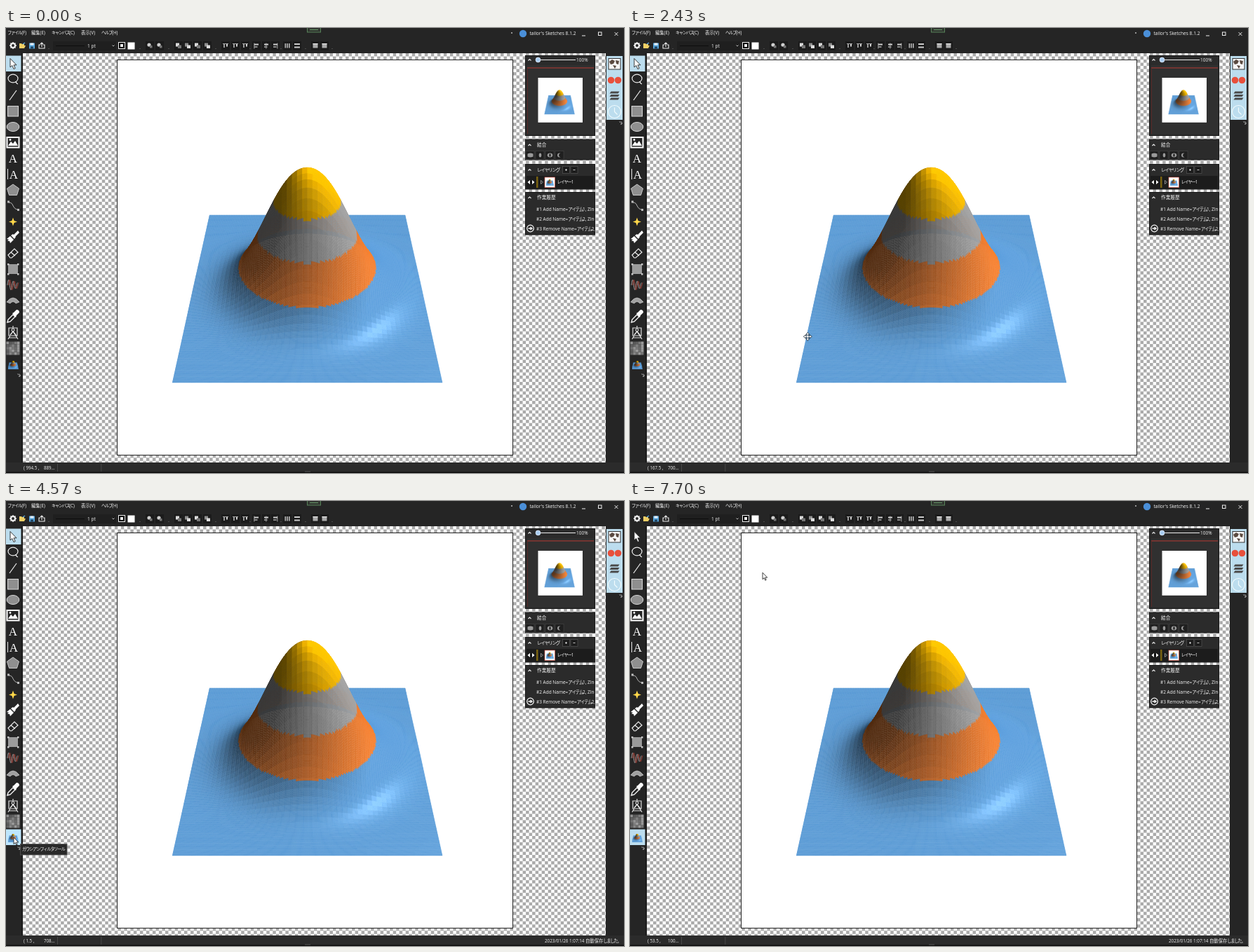
Write an HTML page with a canvas that moves like this. It is 881 px wide and 635 px high and loops after 8000 ms.

```html
<!DOCTYPE html>
<html lang="ja">
<head>
<meta charset="utf-8">
<title>Drawing editor</title>
<style>
html, body { margin: 0; width: 100%; height: 100%; overflow: hidden; background: #252525; }
canvas { display: block; }
</style>
</head>
<body>
<canvas id="stage" width="881" height="635"></canvas>
<script>
const W = 881, H = 635, LOOP = 8000;
const SANS = '"Open Sans", "Noto Sans CJK JP", "Noto Sans CJK", sans-serif';
const LIGHT = '#eeeeee', GREY = '#8f8f8f', DARK = '#252525', SELECTED = '#bcddee';
const screen = document.getElementById('stage').getContext('2d');
let g;

function layer() {
  const c = document.createElement('canvas');
  c.width = W;
  c.height = H;
  return c;
}
function rect(x, y, w, h, fill, stroke, lw = 1) {
  if (fill) { g.fillStyle = fill; g.fillRect(x, y, w, h); }
  if (stroke) { g.strokeStyle = stroke; g.lineWidth = lw; g.strokeRect(x, y, w, h); }
}
function path(x, y, d, fill, stroke, lw = 1) {
  const p = new Path2D(d);
  g.save();
  g.translate(x, y);
  if (fill) { g.fillStyle = fill; g.fill(p); }
  if (stroke) { g.strokeStyle = stroke; g.lineWidth = lw; g.stroke(p); }
  g.restore();
}
function oval(x, y, rx, ry, fill, stroke, lw = 1) {
  g.beginPath();
  g.ellipse(x, y, rx, ry, 0, 0, 7);
  if (fill) { g.fillStyle = fill; g.fill(); }
  if (stroke) { g.strokeStyle = stroke; g.lineWidth = lw; g.stroke(); }
}
// Kana are set tighter than kanji and Latin.
function text(s, x, y, size = 6.4, color = '#f4f4f4') {
  g.font = `${size}px ${SANS}`;
  g.textBaseline = 'alphabetic';
  g.fillStyle = color;
  for (const run of s.match(/[\u3000-\u30ff]+|[^\u3000-\u30ff]+/g)) {
    g.letterSpacing = run[0] >= '\u3000' && run[0] <= '\u30ff' ? `${-0.2 * size}px` : '0px';
    g.fillText(run, x, y + size * 0.36);
    x += g.measureText(run).width;
  }
  g.letterSpacing = '0px';
}

// ---- 3D bell surface on a plane of half-size 1 by DEPTH ----
const DEPTH = 1.2;
const bell = r => 1.131 * Math.exp(-5.25 * r ** 2.2);
const unit = a => { const l = Math.hypot(...a); return a.map(k => k / l); };
const dot = (a, b) => a[0] * b[0] + a[1] * b[1] + a[2] * b[2];
const sheen = unit([0.36, 0.8, 0.45]);

function project(u, v) {
  const h = bell(Math.hypot(u, v)), z = 6.01 + 0.8 * v - 0.6 * h;
  return [429.5 + 972 * u / z, 367.4 - 972 * (0.6 * v + 0.8 * h) / z];
}
function bandColor(h) {
  if (h < 0.22) return [91, 155, 213];
  if (h < 0.53) return [237, 125, 49];
  return h < 0.84 ? [165, 165, 165] : [255, 192, 0];
}
function facet(u, v) {
  const r = Math.hypot(u, v), h = bell(r), slope = 11.55 * r ** 0.2 * h;
  const n = unit([u * slope, 1, v * slope]);
  const view = unit([-u, 3.6 - h, -4.81 - v]), d = dot(n, view);
  const mirror = n.map((k, i) => 2 * d * k - view[i]);
  return {
    light: Math.min(1.04, 0.35 + Math.max(0, 0.42 * n[0] + 0.65 * n[1])),
    gloss: 46 * Math.max(0, dot(mirror, sheen)) ** 38
  };
}
function drawHill() {
  const cells = 50, sub = 4, n = cells * sub, at = i => i * 2 / n - 1;
  const facets = [];
  for (let i = 0; i < cells * cells; i++) {
    const u = (i % cells + 0.5) * 2 / cells - 1;
    facets.push(facet(u, DEPTH * ((Math.floor(i / cells) + 0.5) * 2 / cells - 1)));
  }
  g.lineWidth = 0.5;
  for (let j = n - 1; j >= 0; j--) {
    const near = DEPTH * at(j), far = DEPTH * at(j + 1);
    for (let i = 0; i < n; i++) {
      const f = facets[Math.floor(j / sub) * cells + Math.floor(i / sub)];
      const h = bell(Math.hypot(at(i + 0.5), (near + far) / 2));
      const rgb = bandColor(h).map(k => Math.min(255, Math.round(k * f.light + f.gloss)));
      g.fillStyle = g.strokeStyle = `rgb(${rgb})`;
      g.beginPath();
      g.moveTo(...project(at(i), near));
      g.lineTo(...project(at(i + 1), near));
      g.lineTo(...project(at(i + 1), far));
      g.lineTo(...project(at(i), far));
      g.fill();
      g.stroke();
    }
  }
}
const hill = layer();
g = hill.getContext('2d');
drawHill();

function hillIcon(x, y, w, h) {
  g.drawImage(hill, 237, 195, 386, 313, x, y, w, h);
}

// ---- static interface ----
function drawBars() {
  rect(0, 0, W, H, DARK);
  const s = 4.51;
  rect(24, 36, 831, 584, '#ffffff');
  g.save();
  g.beginPath();
  g.rect(24, 36, 831, 584);
  g.clip();
  for (let j = 0; j < 130; j++)
    for (let i = 1 - j % 2; i < 186; i += 2) rect(24 + i * s, 36 + j * s, s, s, '#aaaaaa');
  g.restore();
  rect(158.5, 45.5, 564, 564, '#ffffff', '#222222');
  g.drawImage(hill, 0, 0);
  rect(22, 36, 2, 584, '#1b1b1b');
  rect(0, 620, W, 15, '#2b2b2b');
  rect(0, 633.5, W, 1.5, '#0c0c0c');
  for (const x of [73, 135.5]) rect(x, 622, 0.7, 11, '#555555');
  rect(426, 632.5, 8, 1, '#555555');

  [['ファイル(F)', 2], ['編集(E)', 36], ['キャンバス(C)', 65], ['表示(V)', 107], ['ヘルプ(H)', 136]]
    .forEach(([s, x]) => text(s, x, 7, 6.3));
  rect(429.5, -2, 19, 8, '#30352f', '#58835a');
  rect(433, 2, 12, 1, '#6a9a6c');
  oval(721, 7, 1, 1, '#bbbbbb');
  oval(737, 8, 5.2, 5.2, '#4a8fd8');
  text("tailor's Sketches 8.1.2", 746.5, 8, 6.6);
  rect(821, 10.5, 5, 1, LIGHT);
  rect(844.5, 6, 4.5, 4.5, null, LIGHT);
  path(870, 8.5, 'M-2.4-2.4L2.4 2.4M2.4-2.4L-2.4 2.4', null, LIGHT);
}

function drawToolbar() {
  oval(10, 25, 3, 3, null, LIGHT, 2.2);
  path(10, 25, 'M0-5V-3M0 3V5M-5 0H-3M3 0H5M-3.5-3.5L-2-2M2 2L3.5 3.5M3.5-3.5L2-2M-2 2L-3.5 3.5', null, LIGHT, 1.5);
  path(23, 25, 'M-4 4V-3H-1L0-2H3V0H5L3 4Z', '#f0cf65');
  path(23, 25, 'M1-2L4-4', null, '#5aa9e6', 1.3);
  rect(33, 21.5, 8, 8, '#57a5dc');
  rect(34.5, 21.5, 5, 3, '#e8f2fa');
  rect(35, 26.5, 4, 3, '#1f4563');
  path(51, 25, 'M-2-1H-4V4H4V-1H2M0 2V-4M-2-2L0-4L2-2', null, LIGHT, 1.1);
  for (const x of [61, 191, 232, 299, 348, 392, 427, 465]) oval(x, 29.5, 0.6, 0.6, '#777777');

  rect(67, 19, 90, 13, '#1f1f1f');
  rect(71, 25, 41, 0.8, '#090909');
  text('1 pt', 116, 25.5, 6.5);
  path(153, 25, 'M-1.5-.5L0 1L1.5-.5', null, LIGHT, 0.8);
  rect(160.5, 20.5, 9, 9, '#000000', LIGHT);
  rect(163, 23, 4, 4, LIGHT);
  rect(173.5, 20.5, 10, 10, '#ffffff');

  const slots = [205, 219, 246, 259, 273, 287, 313, 327, 341, 357, 371, 384, 401, 415, 441, 454];
  slots.forEach((x, i) => {
    rect(x - 6, 19, 12, 12.5, '#1b1b1b');
    if (i < 2) {
      oval(x - 1, 24, 2.6, 2.6, '#cfcfcf');
      rect(x, 25, 3.5, 3.5, '#777777');
    } else if (i < 6) {
      rect(x - 4, 21.5, 5, 5, i % 2 ? '#8d8d8d' : '#dddddd');
      rect(x - 1, 24.5, 5, 4.5, i % 2 ? '#dddddd' : '#777777');
    } else if (i < 9) {
      rect(x - 4, 22, 8, 0.8, '#cccccc');
      rect(x - 3, 23, 2, 5, '#999999');
      rect(x + 1, 23, 2, 3.5, '#cccccc');
    } else if (i < 12) {
      rect(x - 3.5 + (i - 9) * 3, 21.5, 0.8, 8, '#cccccc');
      rect(x - 3, 22.5, 6, 2, '#cccccc');
      rect(x - 3, 26, 4.5, 2, '#888888');
    } else if (i === 12) {
      for (const k of [-3.5, -0.8, 2]) rect(x + k, 22, 1.6, 6.5, '#bbbbbb');
    } else if (i === 13) {
      rect(x - 4, 22, 8, 2, '#cccccc');
      rect(x - 4, 26.5, 8, 2, '#cccccc');
    } else {
      rect(x - 3.5, 22, 7, 6.5, '#aaaaaa');
      rect(x - 3.5, 22, 7, 1.2, '#eeeeee');
    }
  });
}

function drawTools() {
  const X = 10;
  oval(X, 72, 7, 5.8, null, LIGHT, 1.2);
  path(X, 73, 'M4 3Q4 6 7 7', null, LIGHT, 1.2);
  path(X, 96, 'M-5 7L5-7', null, LIGHT, 1.2);
  rect(2.5, 111.5, 15, 14.5, GREY, '#d8d8d8');
  oval(X, 141, 8.8, 6.5, GREY, '#d8d8d8');
  rect(1.5, 156, 17, 14.5, DARK, '#ffffff', 2);
  path(X, 163, 'M-7 5L-3-1L0 2L3-2L7 5Z', '#ffffff');
  oval(6, 159.5, 1.4, 1.4, '#ffffff');
  g.font = '17px "Liberation Serif", serif';
  g.textAlign = 'center';
  g.fillStyle = '#ffffff';
  g.fillText('A', X, 192);
  g.fillText('A', X + 1, 214.5);
  g.textAlign = 'left';
  rect(2, 201, 1, 15, LIGHT);
  path(X, 231, 'M0-8L8.5-2L5.5 7.5H-5.5L-8.5-2Z', GREY, '#c8c8c8');
  path(X, 254, 'M-6-5C1-6-1 5 7 5', null, '#bbbbbb');
  rect(2, 246.5, 3, 3, '#bbbbbb');
  rect(16, 258, 3, 3, '#bbbbbb');
  path(X, 276.5, 'M0-6L1.6-1.6L6 0L1.6 1.6L0 6L-1.6 1.6L-6 0L-1.6-1.6Z', '#ffd84a');
  path(X, 298, 'M7-9L9-6L3 0L1-3ZM0-4L4 0L2 3L-3-2ZM-4-1L1 4L-4 9L-5 6L-8 6L-6 4L-9 3Z', '#ffffff');
  path(X, 321, 'M-7 3L2-6L7-1L-2 7H-4ZM-3-1L3 4', null, LIGHT, 1.2);
  rect(3, 337, 14, 14, '#9b9b9b');
  for (const x of [2, 16]) for (const y of [336, 350]) rect(x, y, 2.5, 2.5, '#c8c8c8');
  for (const [dx, color] of [[0, '#b8b8b8'], [1.8, '#c8483a']]) {
    g.beginPath();
    for (let k = 0; k <= 60; k++) g.lineTo(2 + dx + k * 0.24, 367 - Math.sin(k * 0.23) * (8 - k * 0.07));
    g.strokeStyle = color;
    g.lineWidth = 0.8;
    g.stroke();
  }
  path(X, 389, 'M-9 2Q0-10 9 2L4 4Q0-1-4 4Z', '#a0a0a0', '#cccccc', 0.7);
  path(X, 411, 'M-8 9L-7 5L0-2L3 1L-4 8Z', null, '#ffffff', 1.3);
  path(X, 411, 'M-1-4L1-5L5-9Q9-9 9-5L5-1L4 2Z', '#ffffff');
  path(X, 434, 'M-6-6H6V5H-6ZM0-9V-6M-4 5L-7 10M4 5L7 10M-6 8H6', null, '#e0e0e0', 1.2);
  oval(X, 431, 2, 2, null, LIGHT);
  path(X, 434, 'M-4 4L0-1L4 4M0-1L5 6', null, LIGHT, 1.3);
  let seed = 7;
  for (let k = 0; k < 25; k++) {
    seed = seed * 73 % 1009;
    const c = 85 + seed % 75;
    rect(0.5 + k % 5 * 3.8, 447.5 + Math.floor(k / 5) * 3.8, 3.8, 3.8, `rgb(${c},${c},${c})`);
  }
  overflow(18, 495);
}
function overflow(x, y) {
  path(x, y, 'M-1.5-1.5L0 0M.5-1.5L2 0V2H0', null, LIGHT, 0.8);
}

function panel(y, bottom, title, titleY) {
  rect(740.5, y + 0.5, 99, bottom - y - 1, '#2b2b2b', '#171717');
  path(746.5, titleY, 'M-2 1L0-1L2 1', null, LIGHT, 1.1);
  if (title) text(title, 757, titleY, 6.7);
}
function drawPanels() {
  panel(39, 154, '', 45.5);
  rect(758, 45, 54, 1, '#eeeeee');
  oval(758.5, 45.5, 3.4, 3.4, '#a9cdf2', '#e8f2ff', 0.8);
  text('100%', 813, 45.5, 6.5);
  rect(743, 53, 95, 99, '#303030');
  rect(743, 56.5, 95, 0.9, '#c43a32');
  rect(743, 57, 0.7, 94, '#6e2926');
  rect(758.5, 71, 63.5, 63.8, '#ffffff');
  g.drawImage(hill, 158, 45, 564, 564, 758.5, 71, 63.5, 63.8);

  panel(158.5, 188.5, '結合', 167);
  for (const x of [747, 761, 775, 789]) rect(x - 6, 175.5, 12, 12, '#1f1f1f', '#484848', 0.6);
  path(747.5, 181.5, 'M-4-2Q0-4 4-2V2Q0 4-4 2Z', '#9a9a9a');
  oval(761.5, 181.5, 1.8, 3, '#9a9a9a');
  oval(775.5, 181.5, 3.8, 3, '#9a9a9a');
  oval(775.5, 181.5, 1.2, 2.2, '#202020');
  oval(789, 181.5, 3, 3, '#9a9a9a');
  oval(791, 181.5, 2.8, 2.8, '#1f1f1f');

  panel(194, 230.5, 'レイヤリング', 202.5);
  for (const x of [798.5, 810]) {
    rect(x - 5, 197.5, 10, 10, '#1d1d1d', '#555555', 0.7);
    rect(x - 1.5, 202, 3, 0.8, LIGHT);
  }
  rect(798.1, 200.9, 0.8, 3, LIGHT);
  rect(742, 211, 96, 18, '#1c1c1c');
  path(748.5, 220, 'M-5 0L-1.5-3V3ZM5 0L1.5-3V3Z', '#ffffff');
  oval(748.5, 220, 1.7, 2.5, '#111111');
  rect(756, 212, 2.5, 16, '#7a6210');
  path(764, 220, 'M-1.5-2.5L1.5 0L-1.5 2.5Z', null, '#bbbbbb', 0.7);
  rect(768, 213, 14.5, 14.5, '#ffffff', '#d45a4c', 0.7);
  hillIcon(769.5, 215.5, 11.5, 9.5);
  text('レイヤー1', 785.5, 220, 6.3);

  panel(234, 295.5, '作業履歴', 242);
  g.save();
  g.beginPath();
  g.rect(741, 250, 98, 44);
  g.clip();
  text('#1 Add Name=アイテム1, ZIndex', 756, 258.5, 6.5);
  text('#2 Add Name=アイテム2, ZIndex', 756, 272.5, 6.5);
  text('#3 Remove Name=アイテム2, ZIndex', 756, 286.5, 6.5);
  g.restore();
  oval(747.5, 286, 4.8, 4.8, null, '#ffffff', 1.2);
  path(747.5, 286, 'M-3 0H2M0-2L2.5 0L0 2', null, '#ffffff', 1.3);

  rect(856, 40, 23, 91, SELECTED);
  rect(859, 43.5, 17, 15.5, '#f7f7f7', '#333333');
  path(867, 51, 'M-7-3L-3-6L1-4L-1 0L-5 1ZM2-5L7-4L6 1L3 0ZM-2 2L3 3L1 7Z', '#5b4a40');
  oval(862.5, 74.5, 4.8, 4.8, '#e8503c');
  oval(872.5, 74.5, 4.8, 4.8, '#e8503c');
  for (const y of [92, 96.5, 101]) path(867.5, y, 'M-5-1.5H7L5 1.5H-7Z', '#4b4b4b');
  oval(867.5, 119.5, 9, 9, null, '#f0fafd', 1.2);
  path(867.5, 119.5, 'M0-6V0L4 4', null, '#f0fafd', 1.2);
  overflow(876, 135);
}

const base = layer();
g = base.getContext('2d');
g.imageSmoothingQuality = 'high';
[drawBars, drawToolbar, drawTools, drawPanels].forEach(draw => draw());

const FIRST = 1220, TICK = 1000 / 15;
const track = [
  [0, 849, 624], [3, 735, 515], [6, 560, 456], [9, 505, 481], [11, 505, 481], [12, 505, 482],
  [15, 400, 446], [17, 300, 438], [20, 160, 445], [24, 79, 456], [26, 78, 459],
  [31, 45, 466], [37, 15, 477], [40, 11, 479], [44, 11, 479], [45, 11, 480], [78, 11, 480],
  [82, 120, 410], [86, 240, 270], [89, 215, 150], [91, 195, 114], [97, 189, 102.2], [999, 189, 102.2]
];
function pointer(n) {
  const k = track.findIndex(p => p[0] > n), [a, b] = [track[k - 1], track[k]];
  const f = (n - a[0]) / (b[0] - a[0]);
  return [a[1] + (b[1] - a[1]) * f, a[2] + (b[2] - a[2]) * f];
}
// The read-out keeps the last position over the page.
function readout(n) {
  let last = ['994.5', 889];
  for (let i = 0; i <= n; i++) {
    const [x, y] = pointer(i);
    if (x > 159 && x < 722 && y > 46 && y < 609)
      last = [(Math.floor((x - 159) * 1.775) + 0.5).toFixed(1), Math.floor((y - 45.6) * 1.775)];
  }
  return last;
}

const start = performance.now();
g = screen;
g.imageSmoothingQuality = 'high';

function frame() {
  const t = (performance.now() - start) % LOOP;
  const n = Math.floor((t - FIRST) / TICK);
  const [x, y] = n < 0 ? [W, H] : pointer(n);
  const hillTool = n >= 67, hover = x < 22 && y > 469 && y < 491;
  g.drawImage(base, 0, 0);

  if (!hillTool) rect(0, 39.5, 21.5, 22.5, SELECTED);
  path(10, 51, 'M-4-7.5V5L-1.2 2.5L1 7.5L3.2 6.5L1 1.8H5Z', '#ffffff', '#222222', 0.9);
  if (hillTool || hover) {
    rect(0, 468.5, 21.5, 22.5, hillTool ? SELECTED : n >= 65 ? '#c4e5f6' : '#bee6fd');
  }
  hillIcon(2.5, 474.5, 15.5, 12.5);

  const [px, py] = readout(n);
  text(`( ${px} ,`, 25, 627.5, 6.2);
  text(`${py}...`, 54, 627.5, 6.2);
  if (n >= 31) text('2023/01/26 1:07:14 自動保存しました。', 768, 627.5, 6.3);

  if (n >= 48 && n < 65) {
    g.globalAlpha = Math.min(1, (n - 47) / 3);
    rect(20.5, 489.5, 66.5, 15.5, '#292929', '#555555', 0.8);
    text('ガウシアンフィルタツール', 23, 497, 6.3);
    g.globalAlpha = 1;
  }
  if (n >= 0) {
    if (!hillTool && x > 237 && x < 622 && y > 197 && y < 506) {
      path(x, y, 'M0-6L2.5-3H1V-1H3V-2.5L6 0L3 2.5V1H1V3H2.5L0 6L-2.5 3H-1V1H-3V2.5L-6 0L-3-2.5V-1H-1V-3H-2.5Z',
        '#ffffff', '#10202c', 0.8);
    } else {
      path(x, y, 'M0 0V9.5L2.2 7.5L3.8 11L5.2 10.4L3.7 7H6.7Z', '#ffffff', '#111111', 0.8);
    }
  }
  requestAnimationFrame(frame);
}
frame();
</script>
</body>
</html>
```
